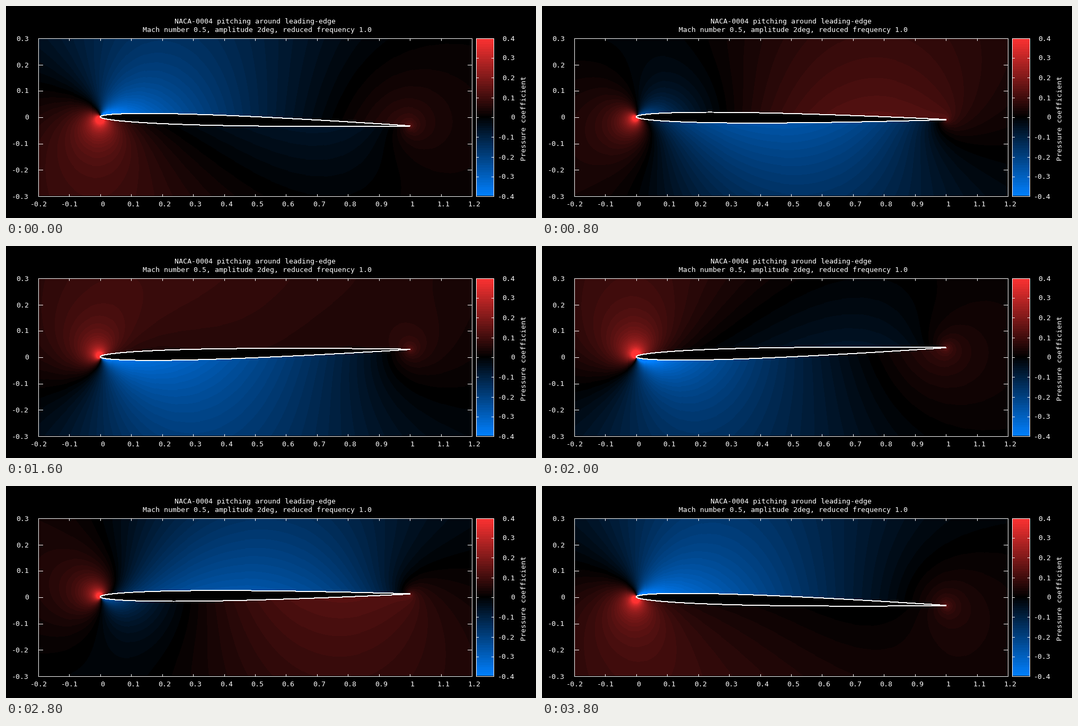
Animation, 1000 px wide and 400 px high, one loop 4 s. Source, as a matplotlib script:

```python
import numpy as np
import matplotlib.pyplot as plt
from matplotlib.animation import FuncAnimation
from matplotlib.patches import Polygon

W, H, DPI = 1000, 400, 100
LEFT, RIGHT, TOP, BOTTOM = 61, 879, 60, 358
BAR_L, BAR_R = 887, 920
FRAMES, INTERVAL = 20, 200
SX = (RIGHT - LEFT) / 1.4
SY = (BOTTOM - TOP) / 0.6
X0, Y0 = LEFT + 0.2 * SX, (TOP + BOTTOM) / 2
PAD = 25

MACH, FREQ, AMP = 0.5, 1.0, np.radians(2)
BETA = np.sqrt(1 - MACH**2)
LAM = FREQ * MACH**2 / BETA**2
KAPPA = FREQ * MACH / BETA**2


def integrate(values, step):
    return step * (values.sum() - (values[0] + values[-1]) / 2)


def thickness(x):
    return 0.2 * (0.2969 * np.sqrt(x) - 0.126 * x - 0.3516 * x**2
                  + 0.2843 * x**3 - 0.1015 * x**4)


def steady_cp(x, y):
    """Linearised pressure of the symmetric section."""
    z = x + 1j * BETA * (np.abs(y) + 1e-6)
    q = np.sqrt(z)
    total = 0.14845 / q * (np.log(q + 1) - np.log(q - 1))
    term = np.log(z) - np.log(z - 1)
    for n, c in enumerate((-0.126, -0.7032, 0.8529, -0.406)):
        if n:
            term = z * term - 1 / n
        total = total + c * term
    return -2 * 0.2 / (np.pi * BETA) * total.real


def solve_modes(modes, xi, slopes):
    """Outgoing Helmholtz modes in elliptic coordinates with given wall slopes."""
    size, h = len(modes), xi[1] - xi[0]
    eye = np.eye(size)
    couple = 0.5 * (np.eye(size, k=2) + np.eye(size, k=-2))
    couple[0, 0] = -0.5

    def block(s):
        k = np.diag(modes**2) - KAPPA**2 / 2 * (np.cosh(2 * s) * eye - couple)
        return 2 * eye + h * h * k

    reach = KAPPA * np.exp(xi[-1]) / 2
    decay = -np.sqrt(modes**2 - reach**2 + 0j) - 0.5
    ratios = [2 * np.linalg.inv(block(xi[-1]) - 2 * h * np.diag(decay))]
    for s in xi[-2:0:-1]:
        ratios.append(np.linalg.inv(block(s) - ratios[-1]))
    ratios.reverse()
    f = [np.linalg.solve(block(0) - 2 * ratios[0], -2 * h * slopes)]
    for r in ratios:
        f.append(r @ f[-1])
    return np.array(f)


def unsteady_cp(x, y):
    """Complex pressure amplitude of the pitching plate."""
    modes = np.arange(1.0, 17.0)
    signs = (-1.0) ** modes
    h = 0.005
    xi = np.arange(641) * h

    # Wall condition from the plate's acceleration
    eta = (np.arange(400) + 0.5) * np.pi / 400
    c = np.cos(eta)
    wall = (AMP / BETA * (2j * FREQ - FREQ**2 * (1 + c))
            * np.exp(-1j * LAM * c) * np.sin(eta))
    forced = 2 / 400 * np.sin(np.outer(modes, eta)) @ wall
    edge = 2 * signs * modes
    f = solve_modes(modes, xi, np.stack([forced, edge + 0j], axis=1))
    smooth, circ = f[:, :, 0], f[:, :, 1]
    circ = circ + 2 * signs * np.exp(-np.outer(xi, modes))

    # Upwash at the leading edge fixes the circulatory strength
    sigma = LAM + FREQ
    phase = np.exp(-1j * sigma * np.cosh(xi))
    phase = phase * np.cos(np.clip(xi - xi[-1] + 1, 0, 1) * np.pi / 2) ** 2
    weights = -modes * signs
    up_smooth = BETA * integrate(phase * (smooth @ weights), h)
    sing = 0.5 / np.sinh(xi[1:] / 2) ** 2
    start = np.exp(-1j * sigma)
    g = phase[1:] * (sing + (circ @ weights)[1:]) - sing * start
    up_circ = BETA * (integrate(g, h) + h * g[0] - start / np.tanh(xi[-1] / 2))
    strength = (AMP * np.exp(-1j * FREQ) - up_smooth) / up_circ

    z = 2 * x - 1 + 2j * BETA * (y + 1e-6)
    zeta = np.arccosh(z)
    w = np.exp(zeta)
    field = strength * ((w - 1) / (w + 1)).imag
    coeffs = smooth + strength * circ
    for i, n in enumerate(modes):
        amp = np.interp(zeta.real, xi, coeffs[:, i])
        field = field + amp * np.sin(n * zeta.imag)
    return 2 * np.exp(1j * LAM * z.real) * field


LEVELS = 65
ramp = np.linspace(-1, 1, LEVELS)[:, None]
LUT = np.where(ramp > 0, ramp * [255, 50, 50], -ramp * [0, 128, 255])
LUT = np.rint(LUT).astype(np.uint8)


def shade(cp):
    level = np.clip((cp + 0.4) / 0.8, 0, 1) * (LEVELS - 1)
    return LUT[np.rint(level).astype(int)]


cols = np.arange(LEFT + 1, RIGHT)
rows = np.arange(TOP + 1, BOTTOM)
body_rows = np.arange(TOP + 1 - PAD, BOTTOM + PAD)
xs = (cols - X0) / SX
gx, gy = np.meshgrid(xs, (Y0 - body_rows) / SY)
STEADY = steady_cp(gx, gy)
WAVE = unsteady_cp(gx, gy)

# Section outline, trailing edge round the nose and back
s = np.linspace(-1, 1, 161)
foil_x = s**2
foil_y = -np.sign(s) * thickness(foil_x)


def pitch(i):
    return 2 * np.pi * i / FRAMES


def field_image(i):
    alpha = AMP * np.cos(pitch(i))
    body = STEADY + (WAVE * np.exp(1j * pitch(i))).real
    body = body - (BETA * body / 2) ** 2  # second-order Bernoulli term
    shift = np.rint(alpha * xs * SY).astype(int)
    idx = np.arange(len(rows))[:, None] + PAD - shift[None, :]
    return shade(body[idx, np.arange(len(cols))[None, :]])


def outline(i):
    a = AMP * np.cos(pitch(i))
    x = foil_x * np.cos(a) + foil_y * np.sin(a)
    y = foil_y * np.cos(a) - foil_x * np.sin(a)
    return np.column_stack([X0 + x * SX, Y0 - y * SY]) - 0.5


fig = plt.figure(figsize=(W / DPI, H / DPI), dpi=DPI, facecolor="black")
ax = fig.add_axes([0, 0, 1, 1])
ax.set_axis_off()
PX = 72 / DPI


def line(x, y):
    # The quarter pixel keeps snapping on the intended pixel
    ax.plot(np.array(x) - 0.25, np.array(y) + 0.25, color="white", lw=PX,
            antialiased=False, snap=True, zorder=5,
            solid_capstyle="projecting", solid_joinstyle="miter")


def box(l, r, t, b):
    line([l, r, r, l, l], [t, t, b, b, t])


def label(x, y, text, ha="center", **kw):
    ax.text(x, y, text, ha=ha, color="white", family="DejaVu Sans Mono",
            size=13.29 * PX, **{"va": "baseline", **kw})


def image(data, l, r):
    return ax.imshow(data, extent=(l + 0.5, r - 0.5, BOTTOM - 0.5, TOP + 0.5),
                     interpolation="nearest", aspect="auto", zorder=1)


field = image(field_image(0), LEFT, RIGHT)
bar = shade(0.4 - 0.8 * (rows - TOP) / (BOTTOM - TOP))
image(np.repeat(bar[:, None, :], BAR_R - BAR_L - 1, axis=1), BAR_L, BAR_R)

foil = Polygon(outline(0), closed=True, facecolor="black", edgecolor="white",
               lw=PX, antialiased=False, joinstyle="round", zorder=4)
ax.add_patch(foil)

box(LEFT, RIGHT, TOP, BOTTOM)
box(BAR_L, BAR_R, TOP, BOTTOM)

for n in range(-2, 13):
    x = round(X0 + n / 10 * SX)
    line([x, x], [BOTTOM, BOTTOM - 4])
    line([x, x], [TOP, TOP + 4])
    label(x + (4 if n >= 0 else 0), 378, f"{n / 10:g}")

for n in range(-3, 4):
    y = round(Y0 - n / 10 * SY)
    line([LEFT, LEFT + 8], [y, y])
    line([RIGHT - 8, RIGHT], [y, y])
    label(42.5, y + 5, f"{n / 10:g}", ha="right")

for n in range(-4, 5):
    y = round(Y0 - n / 8 * (BOTTOM - TOP))
    line([BAR_L, BAR_L + 4], [y, y])
    line([BAR_R - 4, BAR_R], [y, y])
    label(959.5, y + 5, f"{n / 10:g}", ha="right")

label(470, 33, "NACA-0004 pitching around leading-edge")
label(474, 49, "Mach number 0.5, amplitude 2deg, reduced frequency 1.0")
label(977, 211, "Pressure coefficient", rotation=90, va="center")

ax.set_xlim(-0.5, W - 0.5)
ax.set_ylim(H - 0.5, -0.5)


def update(i):
    field.set_data(field_image(i))
    foil.set_xy(outline(i))
    return field, foil


anim = FuncAnimation(fig, update, frames=FRAMES, interval=INTERVAL,
                     repeat=True, repeat_delay=0, blit=False)
plt.show()
```
